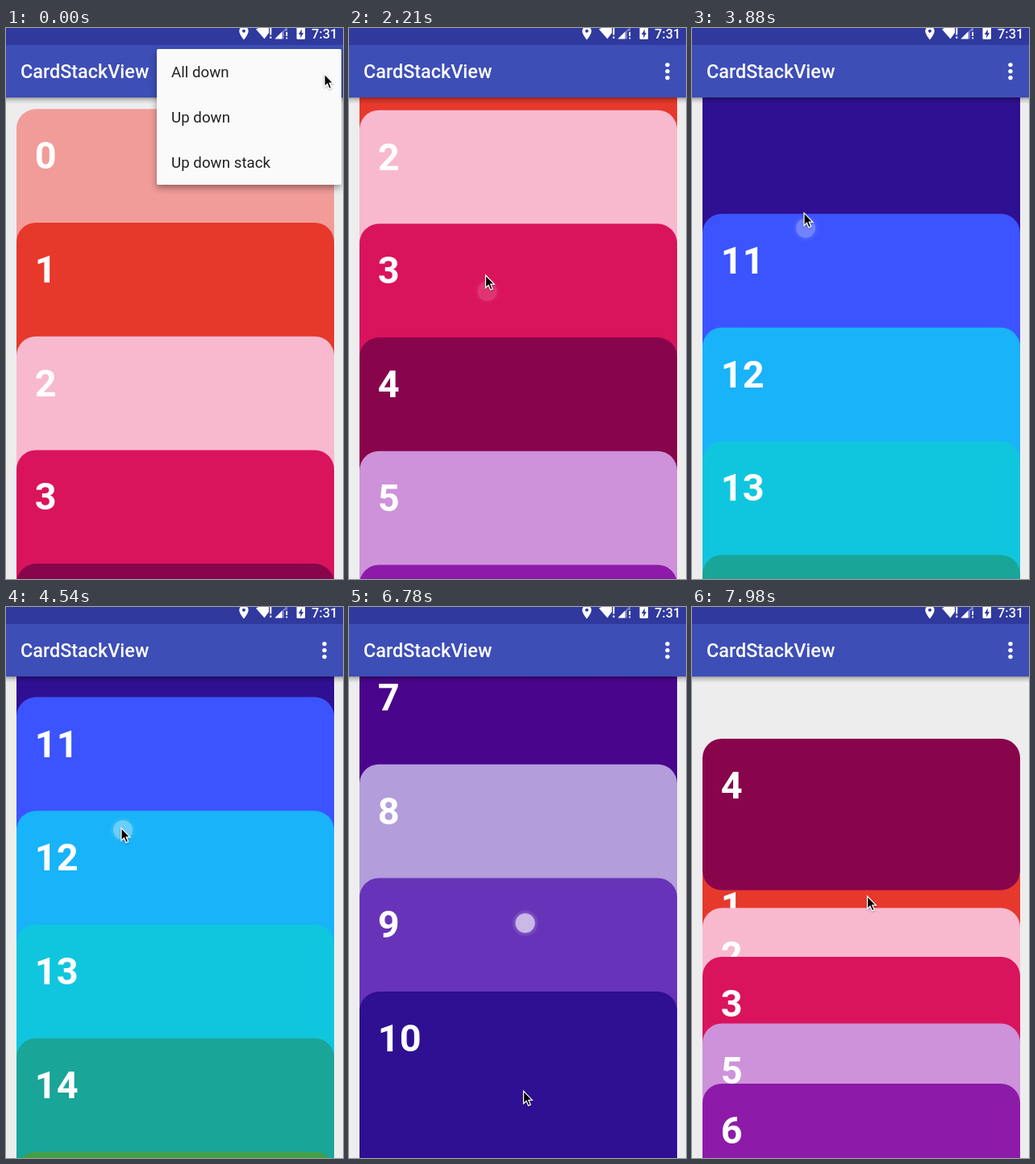
An HTML page that plays this animation: 418 px wide and 682 px high, repeating every 8000 ms.

```html
<!DOCTYPE html>
<html lang="en">
<head>
<meta charset="utf-8">
<title>Card stack</title>
<style>
  html, body { margin: 0; width: 100%; height: 100%; overflow: hidden; background: #ededed; }
  svg { display: block; width: 418px; height: 682px; font-family: Roboto, sans-serif; }
  .number { font-size: 46.9px; font-weight: 700; fill: #fff; }
  .title { font-size: 23.4px; font-weight: 500; fill: #fff; }
  .clock { font-size: 16.4px; font-weight: 500; fill: #fff; }
  .item { font-size: 18.75px; fill: #212121; }
</style>
</head>
<body>
<svg viewBox="0 0 418 682">
  <defs>
    <linearGradient id="barShade" x2="0" y2="1">
      <stop offset="0" stop-opacity=".34"/>
      <stop offset=".4" stop-opacity=".14"/>
      <stop offset="1" stop-opacity="0"/>
    </linearGradient>
    <radialGradient id="glow">
      <stop offset=".65" stop-color="#fff" stop-opacity=".5"/>
      <stop offset="1" stop-color="#fff" stop-opacity="0"/>
    </radialGradient>
    <filter id="menuShade" x="-10%" y="-10%" width="120%" height="125%">
      <feDropShadow dx="0" dy="4" stdDeviation="4" flood-opacity=".38"/>
    </filter>
    <filter id="cursorShade" x="-50%" y="-30%" width="200%" height="170%">
      <feDropShadow dx="0" dy="1" stdDeviation=".8" flood-opacity=".35"/>
    </filter>
  </defs>

  <rect width="418" height="682" fill="#ededed"/>
  <g id="cards"></g>

  <rect y="86" width="418" height="8" fill="url(#barShade)"/>
  <rect width="418" height="86" fill="#3d4eb6"/>
  <rect width="418" height="21" fill="#2f399e"/>
  <text class="title" x="18" y="62">CardStackView</text>
  <g fill="#fff">
    <circle cx="395" cy="45.6" r="2.7"/>
    <circle cx="395" cy="53.6" r="2.7"/>
    <circle cx="395" cy="61.6" r="2.7"/>
  </g>

  <g id="status" fill="#fff">
    <path fill-rule="evenodd" d="M295-2a5.7 5.7 0 0 0-5.7 5.7C289.3 8 295 14.5 295 14.5S300.700 8 300.700 3.700A5.700 5.700 0 0 0 295-2ZM295 1.700a2 2 0 1 1 0 4 2 2 0 0 1 0-4Z"/>
    <path d="M310 1.500Q320-4 326 0V6L320.500 13.500Z"/>
    <path d="M327.300 0h2v8.500h-2zm0 10.500h2v2.500h-2z"/>
    <path opacity=".35" d="M333.500 13.500 349-2V4H345V13.500Z"/>
    <path d="M333.500 13.500 342.500 4.500V13.500Z"/>
    <path d="M347.300 5h1.800v5h-1.800zm0 6.500h1.800v2h-1.800z"/>
    <path d="M360.500 0H371V12.500Q371 14 369.500 14H362Q360.500 14 360.500 12.500Z"/>
    <path fill="#2f399e" d="M366.800 1.500 362.800 8H365.200V12.500L369 6H366.800Z"/>
    <text class="clock" x="379" y="13">7:31</text>
  </g>

  <g id="menu">
    <rect x="187" y="26" width="229" height="168" rx="2" fill="#fafafa" filter="url(#menuShade)"/>
    <text class="item" x="205" y="61">All down</text>
    <text class="item" x="205" y="117">Up down</text>
    <text class="item" x="205" y="173">Up down stack</text>
  </g>

  <g id="touch">
    <circle r="17" fill="url(#glow)" opacity=".7"/>
    <circle r="12" fill="#fff"/>
  </g>
  <path id="cursor" d="M0 0V15.500L3.500 12.200 6 18 8.600 16.900 6.200 11.200H10.800Z"
        stroke="#fff" stroke-width="1.200" filter="url(#cursorShade)"/>
</svg>
<script>
const LOOP = 8000;
const STEP = 140.7, OVERLAP = 46.8, FIRST_TOP = 100.3;
const TALL = { 6: 656.3, 10: 422.5 };
const COLORS = ['#f19c99', '#e7382c', '#f8b9cf', '#da135d', '#88054c', '#cd92d9',
  '#8e1aaa', '#49058c', '#b39ddb', '#6734b9', '#2f1092', '#3b54ff', '#18b3f9',
  '#10c6de', '#19a598', '#43a047', '#9ccc65', '#d4e157'];

// Card tops on the way to the collapsed stack, with card 4 selected
const COLLAPSING = [251.5, 312, 372.5, 433, 163, 515.5, 590];
const EXPAND_START = 7735, EXPAND_SHOWN = 245, EXPAND_DURATION = 400;

// [time, scroll offset]
const SCROLL = [[0, 0], [1960, 0], [2210, 278.7], [2330, 480], [2620, 900], [2820, 1030],
  [3000, 1319.8], [3090, 1440], [3300, 1750], [3500, 1860], [3700, 1905], [3880, 2214.4],
  [3970, 2275], [4150, 2365], [4400, 2400], [4460, 2400], [4650, 2170], [4850, 1936.4],
  [5590, 1936.4], [5780, 1770], [5920, 1670], [6200, 1638], [6640, 1638], [6780, 1547.9],
  [6860, 1330], [7000, 960], [7150, 640], [7280, 480], [7450, 390], [7600, 366.5]];

// [time, x, y]
const CURSOR = [[0, 395, 57], [120, 395, 57], [260, 350, 59], [400, 319, 60], [1230, 319, 60],
  [1550, 230, 300], [1850, 176, 606], [1950, 176, 606], [2210, 169.5, 307], [2330, 166, 200],
  [2400, 165, 185], [2760, 165, 560], [2820, 165, 560], [3000, 160, 225.5], [3090, 157, 165],
  [3640, 147, 560], [3700, 147, 560], [3880, 139, 229.5], [3970, 137, 195], [4450, 140, 210],
  [4850, 158, 668], [4920, 158, 668], [5290, 210, 330.5], [5590, 210, 330.5], [5900, 214, 595],
  [6000, 214, 595], [6450, 212, 300], [6640, 212, 300], [6780, 216.5, 598], [6860, 218, 660],
  [7000, 218, 660], [7450, 217.5, 358]];

// [time, y, opacity]
const TOUCH = [[1900, 608, 0], [1960, 606, .1], [2210, 327, .14], [2330, 210, .2], [2400, 195, 0],
  [2810, 560, 0], [2840, 555, .2], [3000, 272, .25], [3090, 180, .2], [3160, 165, 0],
  [3690, 560, 0], [3730, 545, .2], [3880, 248.5, .27], [3970, 200, .2], [4040, 195, 0],
  [4430, 210, 0], [4480, 220, .3], [4650, 440, .4], [4840, 665, .4], [4900, 668, 0],
  [5590, 332, 0], [5650, 345, .3], [5800, 520, .4], [5920, 593, .4], [5990, 595, 0],
  [6610, 300, 0], [6680, 305, .5], [6780, 390, .65], [6860, 600, .6], [6930, 655, 0],
  [7620, 366, 0], [7670, 366, .35], [7740, 366, 0]];

const $ = id => document.getElementById(id);
const clamp = v => Math.min(1, Math.max(0, v));
const place = (node, x, y) => node.setAttribute('transform', `translate(${x.toFixed(2)} ${y.toFixed(2)})`);

function svg(tag, attrs, parent) {
  const node = document.createElementNS('http://www.w3.org/2000/svg', tag);
  for (const key in attrs) node.setAttribute(key, attrs[key]);
  return parent.appendChild(node);
}

// Monotone cubic through the keys, so that holds stay flat
function sample(keys, t, col) {
  const last = keys.length - 1;
  if (t <= keys[0][0]) return keys[0][col];
  if (t >= keys[last][0]) return keys[last][col];
  const i = keys.findIndex(key => key[0] > t) - 1;
  const slope = k => (keys[k + 1][col] - keys[k][col]) / (keys[k + 1][0] - keys[k][0]);
  const tangent = k => {
    if (k === 0 || k === last) return 0;
    const a = slope(k - 1), b = slope(k);
    return a * b > 0 ? 2 * a * b / (a + b) : 0;
  };
  const h = keys[i + 1][0] - keys[i][0], u = (t - keys[i][0]) / h, v = 1 - u;
  return keys[i][col] * (1 + 2 * u) * v * v + keys[i + 1][col] * u * u * (3 - 2 * u)
    + h * u * v * (tangent(i) * v - tangent(i + 1) * u);
}

let nextTop = FIRST_TOP;
const cards = COLORS.map((fill, i) => {
  const top = nextTop, advance = TALL[i] || STEP;
  nextTop += advance;
  const node = svg('g', {}, $('cards'));
  svg('rect', { x: 13, width: 394, height: advance + OVERLAP, rx: 24, fill }, node);
  svg('text', { class: 'number', x: 35.8, y: 74 }, node).textContent = i;
  return { node, top };
});

function expandProgress(t) {
  const swing = ms => 1 - Math.cos(Math.PI * ms / EXPAND_DURATION);
  const elapsed = clamp((t - EXPAND_START) / EXPAND_SHOWN) * EXPAND_SHOWN;
  return swing(elapsed) / swing(EXPAND_SHOWN);
}

function draw(t) {
  const scroll = sample(SCROLL, t, 1), expand = expandProgress(t);
  cards.forEach(({ node, top }, i) => {
    const rest = top - scroll;
    const end = COLLAPSING[i] ?? rest;
    place(node, 0, rest + (end - rest) * expand);
  });

  $('menu').setAttribute('opacity', 1 - clamp((t - 760) / 230));

  const x = sample(CURSOR, t, 1);
  place($('cursor'), x, sample(CURSOR, t, 2));
  place($('touch'), x + 2, sample(TOUCH, t, 1));
  $('touch').setAttribute('opacity', sample(TOUCH, t, 2));
}

const start = performance.now();
function tick() {
  draw((performance.now() - start) % LOOP);
  requestAnimationFrame(tick);
}
tick();
</script>
</body>
</html>
```
